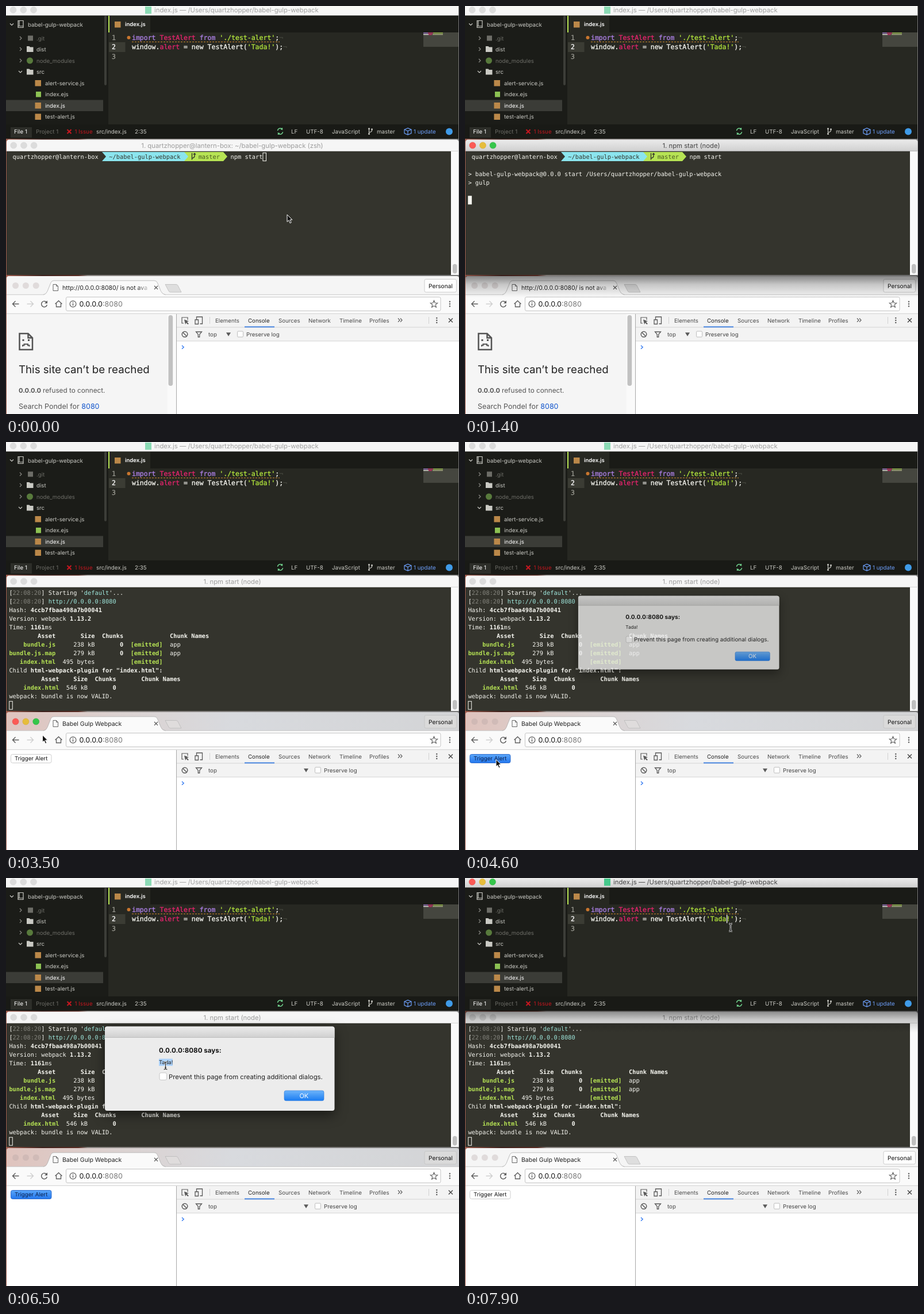
An HTML page for the animation above (8000 ms loop, 788 by 710 pixels).

```html
<!DOCTYPE html>
<html lang="en">
<head>
<meta charset="utf-8">
<title>Editor, terminal and browser</title>
<style>
html, body { margin: 0; width: 100%; height: 100%; overflow: hidden; background: #fff; }
svg { display: block; width: 788px; height: 710px; }
text { font-family: Inter, Roboto, sans-serif; white-space: pre; text-rendering: geometricPrecision; }
.mono { font-family: "DejaVu Sans Mono", "Liberation Mono", monospace; }
#code text { paint-order: stroke; stroke-width: .3px; }
#dialog { transform-origin: 371.5px 331.8px; filter: drop-shadow(0 7px 10px rgba(0,0,0,.5)); }
</style>
</head>
<body>
<svg id="stage" viewBox="0 0 788 710"></svg>
<script>
const LOOP = 8000, STEP = 100;
const LIME = '#b6e354', CYAN = '#8be5ee', PURPLE = '#ae81e8', PINK = '#e8246e',
      WHITE = '#f6f6f0', TERM = '#34342d', AQUA = '#a0eadf';
const USER = 'quartzhopper', HOST = 'lantern-box';

// drawing helpers
const rect = (x, y, w, h, fill, more = '') =>
  `<rect x="${x}" y="${y}" width="${w}" height="${h}" fill="${fill}" ${more}/>`;
const circle = (x, y, r, fill, more = '') => `<circle cx="${x}" cy="${y}" r="${r}" fill="${fill}" ${more}/>`;
const fillPath = (d, fill, more = '') => `<path d="${d}" fill="${fill}" ${more}/>`;
const line = (d, color, width = 1, more = '') =>
  `<path d="${d}" fill="none" stroke="${color}" stroke-width="${width}" ${more}/>`;
const text = (x, y, s, size, fill, more = '') =>
  `<text x="${x}" y="${y}" font-size="${size}" fill="${fill}" ${more}>${s}</text>`;
const group = (id, ...parts) => `<g id="${id}">${parts.join('')}</g>`;
const gradient = (id, stops, across) =>
  `<linearGradient id="${id}" x2="${across ? 1 : 0}" y2="${across ? 0 : 1}">` +
  stops.map(([at, color, alpha = 1]) => `<stop offset="${at}" stop-color="${color}" stop-opacity="${alpha}"/>`).join('') +
  '</linearGradient>';

// segments: [column, text, colour, bold]
const mono = (x, y, size, segments) => segments.map(([col, s, fill = WHITE, bold]) =>
  text(+(x + col * size * 0.602).toFixed(2), y, s, size, fill,
    `class="mono" style="stroke:${fill}" stroke-width="0" ${bold ? 'font-weight="700"' : ''}`)).join('');
const rowY = k => 265.6 + 15.05 * k;
const row = (k, ...segments) => mono(5.4, rowY(k), 10.32, segments);

const lights = (xs, y, on) => xs.map((x, i) =>
  circle(x, y, 5.5, on ? ['#fb5a55', '#e6bd3b', '#35c64a'][i] : '#dcdcdc',
    `stroke="${on ? ['#dd4540', '#cfa52c', '#27ab3a'][i] : '#d4d4d4'}" stroke-width=".5"`)).join('');
const dots = (x, y) => [-4, 0, 4].map(d => circle(x, y + d, 1.2, '#5a5a5a')).join('');

const defs = '<defs>' +
  gradient('bar', [[0, '#ebebeb'], [1, '#d0d0d0']]) +
  gradient('wall', [[0, '#9c5a4c'], [.08, '#3c1f1a'], [.16, '#5a2b22'], [.18, '#8c8784'], [1, '#777']], true) +
  gradient('strip', [[0, '#dfc3bd'], [.25, '#dbd2d1'], [.5, '#d8dade'], [1, '#d3d4d6']], true) +
  gradient('shade', [[0, '#000', .46], [.4, '#000', .19], [1, '#000', 0]]) +
  gradient('fade', [[0, '#fafafa', 0], [1, '#fafafa']], true) +
  gradient('blue', [[0, '#6db4fa'], [1, '#1a7cf2']]) +
  gradient('press', [[0, '#5aa5f8'], [1, '#2377ee']]) + '</defs>';

function editor() {
  const TREE = '#1b1c18', DIM = '#6d6d67', TXT = '#cacac4', JS = '#bb8849', STRING = '#b4e83c';
  const title = on => group(on ? 'edit-on' : 'edit-off',
    rect(0, 0, 787, 16.5, on ? 'url(#bar)' : '#f6f6f6'),
    lights([12.5, 30.3, 48], 6.8, on),
    rect(242, 1, 11, 12.5, '#45c98b', `opacity="${on ? 1 : .6}"`),
    text(258, 11.4, `index.js — /Users/${USER}/babel-gulp-webpack`, 11.3, on ? '#444' : '#a0a0a0'));
  const folder = y => fillPath(`M36 ${y - 5}h4.5l1.5 1.5h5.5v8.5h-11.5z`, TXT);
  const shut = y => line(`M24 ${y - 3}l3 3l-3 3`, '#8a8a84', 1.2);
  const open = (x, y) => line(`M${x - 3} ${y - 1.5}l3 3l3 -3`, TXT, 1.2);
  const names = [
    [38, 32, 'babel-gulp-webpack', TXT], [53, 56, '.git', DIM], [53, 75, 'dist', TXT],
    [53, 95, 'node_modules', DIM], [53, 114.5, 'src', TXT], [68, 134, 'alert-service.js', TXT],
    [68, 153.5, 'index.ejs', TXT], [68, 173, 'index.js', '#fff'], [68, 192.5, 'test-alert.js', TXT]];
  const status = [
    [14, 'File 1', '#fff'], [52, 'Project 1', DIM], [119.5, '1 Issue', '#c4161f'], [157, 'src/index.js', TXT],
    [224, '2:35', TXT], [496, 'LF', TXT], [522, 'UTF-8', TXT], [567, 'JavaScript', TXT],
    [645, 'master', TXT], [709, '1 update', '#6c9ef8']];
  return rect(0, 0, 787, 231, '#272822') + rect(0, 16, 178, 190, TREE) +
    rect(178, 16, 609, 30, '#1a1b17') + rect(179, 17, 72, 29, '#272822') + rect(178, 17, 2, 29, LIME) +
    rect(0, 206, 787, 25, '#191a16') + rect(0, 163.5, 169, 19.5, '#3b3c37') +
    rect(171, 17, 4, 121, '#3c3d38', 'rx="2"') +
    title(true) + title(false) +
    open(10, 32) + [56, 75, 95].map(shut).join('') + open(25, 114.5) + folder(75) + folder(114.5) +
    line('M21 25.5h9v9.5h-9zM23 26v9M21 35v2.5h9v-2.5', TXT, 1.2) +
    rect(38, 51.5, 9, 9, DIM) + circle(41.5, 95, 5.5, '#587a3c') + rect(52, 149, 9, 9.5, '#8cc152') +
    [134, 173, 192.5].map(y => rect(50.5, y - 5, 10.5, 10.5, JS)).join('') + rect(189, 27, 10.5, 10.5, JS) +
    names.map(([x, y, s, c]) => text(x, y + 3.5, s, 9.7, c)).join('') +
    text(207, 35.2, 'index.js', 9.5, '#fff', 'font-weight="600"') +
    rect(179, 63, 28.5, 17, '#3b3c34') +
    group('code',
      ...['1', '2', '3'].map((n, i) => mono(184, 58.7 + 16.7 * i, 11.5, [[0, n, i === 1 ? '#fff' : '#9a9a92']])),
      mono(219, 58.7, 11.5, [[0, 'import', PURPLE], [7, 'TestAlert', PINK], [17, 'from', PURPLE],
        [22, "'./test-alert'", STRING], [36, ';'], [37, '¬', '#45463e']]),
      mono(219, 75.4, 11.5, [[0, 'window.'], [7, 'alert', PINK], [13, '= new TestAlert('],
        [29, "'Tada!'", STRING], [36, ');'], [38, '¬', '#45463e']])) +
    circle(213.5, 55, 3, '#c9762e') +
    line('M219 62.5H476', '#c9862e', 1, 'stroke-dasharray="3 2"') +
    rect(726, 46, 61, 25, '#45463f') +
    rect(726, 46.5, 8, 1.2, PURPLE) + rect(734, 46.5, 9, 1.2, PINK) + rect(743, 46.5, 17, 1.2, LIME) +
    rect(726, 49, 9, 1.2, WHITE) + rect(735, 49, 6, 1.2, PINK) + rect(742, 49, 18, 1.2, '#bcc48c') +
    rect(8, 211, 37, 18, '#2d2e29') +
    status.map(([x, s, c]) => text(x, 222, s, 9.75, c)).join('') +
    line('M106.5 215l7 7m0 -7l-7 7', '#c4161f', 2.2) +
    line('M472.5 217a4.5 4.5 0 0 1 8 -2.5v-2.5m0 2.5h-2.5M481.5 219a4.5 4.5 0 0 1 -8 2.5v2.5m0 -2.5h2.5', '#6fce8b', 1.4) +
    line('M631.5 214v8M636.5 215v1.5q0 2.5 -5 3.5', TXT, 1.2) + circle(631.5, 213.5, 1.5, TXT) +
    circle(631.5, 222.5, 1.5, TXT) + circle(636.5, 214.5, 1.5, TXT) +
    line('M693 215l6 -2.5l6 2.5v6.5l-6 2.5l-6 -2.5zM693 215l6 2.5l6 -2.5M699 217.5v6.5', '#6c9ef8', 1.2) +
    circle(771, 218.5, 6, '#3f9be8') +
    group('caret', rect(455, 64, 1.3, 14.5, '#fff'));
}

function terminal() {
  const bar = on => group(on ? 'term-on' : 'term-off',
    fillPath('M1 252.5V237q0 -4.5 4.5 -4.5H783q4.5 0 4.5 4.5V252.5z', on ? 'url(#bar)' : '#f6f6f6'),
    line('M1 252.5H787', on ? '#aaa' : '#d0d0d0', .8),
    lights([13.2, 31, 48.6], 242.5, on));
  const title = (id, s) => group(id, text(393.5, 246.7, s, 11.3, '#9c9c9c', 'text-anchor="middle"'));
  const stamp = '[<tspan fill="#85857e">22:08:20</tspan>]';
  const starting = k => row(k, [0, stamp], [11, `Starting '<tspan fill="${AQUA}">default</tspan>'...`]);
  const address = k => row(k, [0, stamp], [11, 'http://0.0.0.0:8080', AQUA]);
  const asset = (k, col, name, sizeCol, size, rest) => row(k, [col, name, LIME, 1], [sizeCol, size], ...rest);
  const emitted = [34, '[emitted]', LIME, 1], zero = [31, '0', WHITE, 1], app = [45, 'app'];
  const header = (k, cols) => row(k, ...['Asset', 'Size', 'Chunks', 'Chunk Names'].map((s, i) => [cols[i], s, WHITE, 1]));
  return rect(1, 252, 773, 216, TERM) + rect(774, 252, 13.5, 216, '#fafafa') +
    rect(777, 449, 7.5, 16.5, '#c0c0c0', 'rx="3.7"') +
    bar(true) + bar(false) +
    title('title-zsh', `1. ${USER}@${HOST}: ~/babel-gulp-webpack (zsh)`) + title('title-node', '1. npm start (node)') +
    group('prompt',
      fillPath('M310 254H378l7 8l-7 8H310z', LIME),
      fillPath('M167 254H310l7 8l-7 8H167l7 -8z', CYAN),
      row(0, [1, `${USER}@${HOST}`], [28, '~/babel-gulp-webpack', TERM], [53, 'master', '#4a5a22'], [62, 'npm start']),
      line('M323.5 256v11.5M323.5 265q4.5 -1 4.5 -4v-4m-2 1.5l2 -2l2 2', TERM, 1.4)) +
    group('npm',
      row(2, [0, `&gt; babel-gulp-webpack@0.0.0 start /Users/${USER}/babel-gulp-webpack`]),
      row(3, [0, '&gt; gulp'])) +
    group('gulp',
      row(5, [0, stamp], [11, 'Using gulpfile'], [26, '~/babel-gulp-webpack/gulpfile.js', PURPLE]),
      starting(6), address(7)) +
    group('packed',
      starting(0), address(1),
      row(2, [0, 'Hash:'], [6, '4ccb7fbaa498a7b00041', WHITE, 1]),
      row(3, [0, 'Version: webpack'], [17, '1.13.2', WHITE, 1]),
      row(4, [0, 'Time:'], [6, '1161', WHITE, 1], [10, 'ms']),
      header(5, [8, 20, 26, 45]),
      asset(6, 4, 'bundle.js', 18, '238 kB', [zero, emitted, app]),
      asset(7, 0, 'bundle.js.map', 18, '279 kB', [zero, emitted, app]),
      asset(8, 3, 'index.html', 15, '495 bytes', [emitted]),
      row(9, [0, 'Child'], [6, 'html-webpack-plugin for "index.html":', WHITE, 1]),
      header(10, [9, 18, 24, 37]),
      asset(11, 4, 'index.html', 16, '546 kB', [[29, '0', WHITE, 1]]),
      row(12, [0, 'webpack: bundle is now VALID.'])) +
    rect(0, 0, 5.6, 14, 'none', 'id="block" stroke="#f4f4ee" stroke-width="1"');
}

function browser() {
  const INK = '#5a5a5a', BODY = '#555';
  const strip = on => group(on ? 'web-on' : 'web-off',
    fillPath('M1 503V474q0 -4 4 -4H784q4 0 4 4V503z', on ? 'url(#strip)' : '#f5f5f5'),
    fillPath('M277 484.5h19q2 0 3 2l6 11.5h-19q-2 0 -3 -2z', on ? '#dfdcdc' : '#dedede', 'stroke="#b5b5b5" stroke-width=".7"'),
    rect(728, 475.5, 55.5, 22.5, on ? '#dadada' : '#fdfdfd', 'rx="2.5" stroke="#c2c2c2" stroke-width=".8"'));
  const tabs = [[364, 'Elements'], [421, 'Console'], [474, 'Sources'], [526, 'Network'], [580, 'Timeline'], [632, 'Profiles']];
  const filter = (id, x) => group(id,
    fillPath(`M${x} 568.2h8l-4 6.6z`, INK),
    rect(x + 19.5, 566, 10, 10, '#fff', 'rx="1.5" stroke="#b5b5b5" stroke-width=".9"'),
    text(x + 35, 574.8, 'Preserve log', 9.7, '#444'));
  const label = (id, color) => group(id, text(15, 554.3, 'Trigger Alert', 9.7, color));
  return rect(1, 500, 787, 210, '#fff') + strip(true) + strip(false) +
    group('web-lights', lights([16.6, 34.4, 52.2], 486.5, true)) +
    group('web-dim', [16.6, 34.4, 52.2].map(x => circle(x, 486.5, 5.5, '#b0a0a0', 'opacity=".3"')).join('')) +
    rect(1, 502, 787, 33, '#fafafa') + line('M1 502.3H788', '#bdbdbd', .8) +
    fillPath('M65 503q5 -1 7 -6l6 -15q1.5 -4 5 -4H258q4 0 5.5 4l6 15q2 5 8 6z', '#fafafa') +
    line('M65 502.4q5 -1 7 -6l6 -15q1.5 -3.5 5 -3.5H258q4 0 5.5 4l6 14.5q2 5 8 6', '#b2b2b2', .8) +
    line('M82 484.5h5.5l3 3v8h-8.5zM87.5 484.5v3h3', '#666', 1) +
    group('tab-error', text(98, 493.6, 'http://0.0.0.0:8080/ is not ava', 10.55, '#222')) +
    group('tab-ready', text(98, 493.6, 'Babel Gulp Webpack', 10.5, '#222')) +
    rect(228, 482, 24, 16, 'url(#fade)') +
    line('M258 487l6 6m0 -6l-6 6', INK, 1.2) + text(735, 490.5, 'Personal', 10.2, '#111') +
    line('M22.5 518.5H11.5m5 -5l-5 5l5 5', INK, 1.4) + line('M36.5 518.5h11m-5 -5l5 5l-5 5', '#cfcfcf', 1.4) +
    group('press', rect(56, 507.5, 21, 21, '#cfcfcf', 'rx="2"')) +
    group('reload', line('M70.8 516a5 5 0 1 0 .6 4', INK, 1.4) + fillPath('M72 512.5v5h-5z', INK)) +
    line('M85.5 518.5l6 -5.5l6 5.5M87.5 517.5v6h8v-6', INK, 1.3) +
    rect(104.5, 506.5, 651.5, 24, '#fff', 'rx="2.5" stroke="#c4c4c4" stroke-width="1"') +
    circle(116.5, 518.5, 5.4, 'none', `stroke="${INK}" stroke-width="1.2"`) +
    rect(115.8, 517.5, 1.4, 4, INK) + rect(115.8, 515, 1.4, 1.4, INK) +
    text(127.5, 523, '0.0.0.0<tspan fill="#777">:8080</tspan>', 12.5, '#111') +
    line('M744.5 512.5l1.7 4.3l4.5 .2l-3.5 2.9l1.2 4.4l-3.9 -2.5l-3.9 2.5l1.2 -4.4l-3.5 -2.9l4.5 -.2z', INK, 1.1) +
    dots(772, 518.5) + line('M1 535.3H788', '#cfcfcf', 1) +
    group('error-page',
      rect(1, 536, 295, 174, '#f5f5f5'), rect(280.5, 536, 15.5, 174, '#fafafa'),
      rect(282.5, 538, 7.7, 123, '#c1c1c1', 'rx="3.8"'),
      line('M23.5 570h15l7.5 7.5v20.5h-22.5zM38.5 570v7.5h7.5', '#535353', 2.5),
      rect(28.5, 580, 3, 3, '#535353'), rect(38, 580, 3, 3, '#535353'),
      line('M29 592.5v-2h2.5v-2h6.5v2h2.5v2', '#535353', 2),
      text(22, 639.2, 'This site can’t be reached', 18.7, '#222'),
      text(22, 672.5, '0.0.0.0', 11.1, BODY, 'font-weight="700"'),
      text(64, 672.5, 'refused to connect.', 11.75, BODY),
      text(22, 701, 'Search Pondel for <tspan fill="#1155cc">8080</tspan>', 12.5, BODY)) +
    group('ready-page',
      group('button-off', rect(8.5, 543.5, 70.5, 15, '#fff', 'rx="3" stroke="#c8c8c8" stroke-width=".9"')),
      group('button-on', rect(8.5, 543.5, 70.5, 15, 'url(#press)', 'rx="3" stroke="#2a67c9" stroke-width=".9"')),
      label('label-off', '#111'), label('label-on', '#0b2350')) +
    rect(297, 536, 491, 47, '#f3f3f3') + line('M296.5 536V710', '#a8a8a8', 1) +
    line('M297 559H788M297 583H788', '#d0d0d0', .9) + rect(415, 557.4, 52, 2, '#4a86e0') +
    line('M309 552h-3v-10h10v4', INK, 1.2) + fillPath('M310 545.5l8 3l-3.2 1.3l3 3l-1.4 1.4l-3 -3l-1.4 3z', INK) +
    line('M331.5 546v-5h10v12h-4M329 546h5.5v7.5h-5.5z', INK, 1.3) +
    line('M354.5 541v12M735.5 541v12', '#d2d2d2', 1) +
    tabs.map(([x, s]) => text(x, 551, s, 9.7, s === 'Console' ? '#222' : '#4a4a4a')).join('') +
    line('M682 543.5l3 3.2l-3 3.2M686 543.5l3 3.2l-3 3.2', INK, 1.2) + dots(749.3, 547) +
    line('M770 543.5l7 7m0 -7l-7 7', '#444', 1.4) +
    circle(311, 571.3, 4.8, 'none', `stroke="${INK}" stroke-width="1.5"`) + line('M307.6 568l6.8 6.8', INK, 1.5) +
    line('M330.5 567h10l-3.8 4.5v4.5h-2.4v-4.5z', INK, 1.3) +
    text(352, 574.8, 'top', 9.7, '#444') + filter('filter-near', 383) + filter('filter-far', 518) +
    line('M306 590.8l3.2 3l-3.2 3', '#367cf1', 1.4);
}

const dialog = () => group('dialog',
  rect(172, 258.5, 399.5, 146.5, '#ececec', 'rx="4"'),
  fillPath('M172 277.5V262.5q0 -4 4 -4H567.5q4 0 4 4V277.5z', 'url(#bar)'),
  line('M172 277.5H571.5', '#b5b5b5', .8),
  text(266, 304.3, '0.0.0.0:8080 says:', 11.6, '#111', 'font-weight="700"'),
  group('selection', rect(266, 314.5, 24, 12.5, '#add3fb')),
  text(266, 324, 'Tada!', 9.4, '#222'),
  rect(267, 339, 12.5, 12.5, '#fff', 'rx="2.5" stroke="#bcbcbc" stroke-width=".8"'),
  text(283, 349.6, 'Prevent this page from creating additional dialogs.', 11.3, '#222'),
  rect(484, 370, 69, 17.6, 'url(#blue)', 'rx="3" stroke="#2b78d8" stroke-width=".6"'),
  text(518.3, 382.6, 'OK', 11, '#fff', 'text-anchor="middle"'));

const pointer = () => group('pointer',
  group('arrow', fillPath('M0 0V12.5L2.8 9.8L5 14.8L7.2 13.8L5 9H9z', '#111', 'stroke="#fff" stroke-width="1"')),
  group('beam', ...[['#fff', 2.6], ['#222', 1.2]].map(([c, w]) =>
    line('M-3 -6.5q3 0 3 2V4.5q0 2 3 2M3 -6.5q-3 0 -3 2V4.5q0 2 -3 2M-1.5 3h3', c, w))));

const stage = document.getElementById('stage');
stage.innerHTML = defs + rect(0, 0, 788, 710, 'url(#wall)') + editor() + terminal() + browser() +
  group('shade-term', rect(1, 469.5, 787, 38, 'url(#shade)')) +
  group('shade-edit', rect(0, 231, 788, 38, 'url(#shade)')) + dialog() + pointer();

const parts = {};
stage.querySelectorAll('[id]').forEach(el => parts[el.id] = el);
const show = (id, on) => parts[id].style.display = on ? '' : 'none';
const either = (on, a, b) => { show(a, on); show(b, !on); };
const within = (t, a, b) => t >= a && t < b;
const latest = (steps, t) => steps.filter(s => s[0] <= t).pop();

const FOCUS = [[0, ''], [300, 'term'], [2400, 'web'], [7800, 'edit']];
const BLOCK = [[0, 446.9, 0], [800, 5.7, 1], [1000, 5.7, 5], [2100, 5.7, 8], [3100, 5.7, 13]];
const PATH = [[0, 489, 363], [1900, 489, 363], [2400, 63.5, 510], [3700, 63.5, 510], [4300, 54, 552.5],
  [4900, 54, 552.5], [5900, 277.5, 326.5], [6500, 277.5, 326.5], [6900, 516, 378], [7200, 516, 378],
  [7700, 462, 86], [8000, 462, 86]];

function pointAt(t) {
  const i = PATH.findIndex(p => p[0] > t), [t0, x0, y0] = PATH[i - 1], [t1, x1, y1] = PATH[i];
  const p = (t - t0) / (t1 - t0), e = p * p * (3 - 2 * p);
  return [x0 + (x1 - x0) * e, y0 + (y1 - y0) * e];
}

function render(t) {
  const focus = latest(FOCUS, t)[1], ready = t >= 3200, packed = t >= 3100;
  for (const w of ['edit', 'term', 'web']) either(focus === w, w + '-on', w + '-off');
  show('shade-term', focus === 'term');
  show('shade-edit', focus === 'edit');
  either(focus === 'web' && t < 4500, 'web-lights', 'web-dim');
  show('caret', focus === 'edit');

  either(t < 900, 'title-zsh', 'title-node');
  for (const id of ['title-zsh', 'title-node'])
    parts[id].firstChild.setAttribute('fill', focus === 'term' ? '#444' : '#9c9c9c');
  either(packed, 'packed', 'prompt');
  show('npm', within(t, 1000, 3100));
  show('gulp', within(t, 2100, 3100));
  const [, bx, bk] = latest(BLOCK, t);
  parts.block.setAttribute('x', bx);
  parts.block.setAttribute('y', rowY(bk) - 10);
  parts.block.setAttribute('fill', focus === 'term' ? WHITE : 'none');

  either(ready, 'tab-ready', 'tab-error');
  either(ready, 'ready-page', 'error-page');
  either(ready, 'filter-far', 'filter-near');
  show('press', within(t, 2400, 2800));
  show('reload', !within(t, 2800, 3800));
  const pressed = within(t, 4400, 7000);
  either(pressed, 'button-on', 'button-off');
  either(pressed, 'label-on', 'label-off');

  const grow = Math.min(1, Math.max(0, (t - 4500) / 200));
  const fade = Math.min(1, Math.max(0, (7200 - t) / 200));
  show('dialog', within(t, 4500, 7200));
  parts.dialog.style.transform = `scale(${0.75 + 0.25 * grow})`;
  parts.dialog.style.opacity = (0.6 + 0.4 * grow) * fade;
  show('selection', t >= 6100);

  const [x, y] = pointAt(t);
  const overMessage = within(t, 4600, 7000) && within(x, 266, 292) && within(y, 314, 333);
  either(overMessage || (x > 207 && within(y, 46, 205)), 'beam', 'arrow');
  show('pointer', !within(t, 700, 1900));
  parts.pointer.setAttribute('transform', `translate(${x.toFixed(1)} ${y.toFixed(1)})`);
}

const start = performance.now();
function tick() {
  const t = (performance.now() - start) % LOOP;
  render(Math.floor(t / STEP) * STEP);
  requestAnimationFrame(tick);
}
tick();
</script>
</body>
</html>
```
